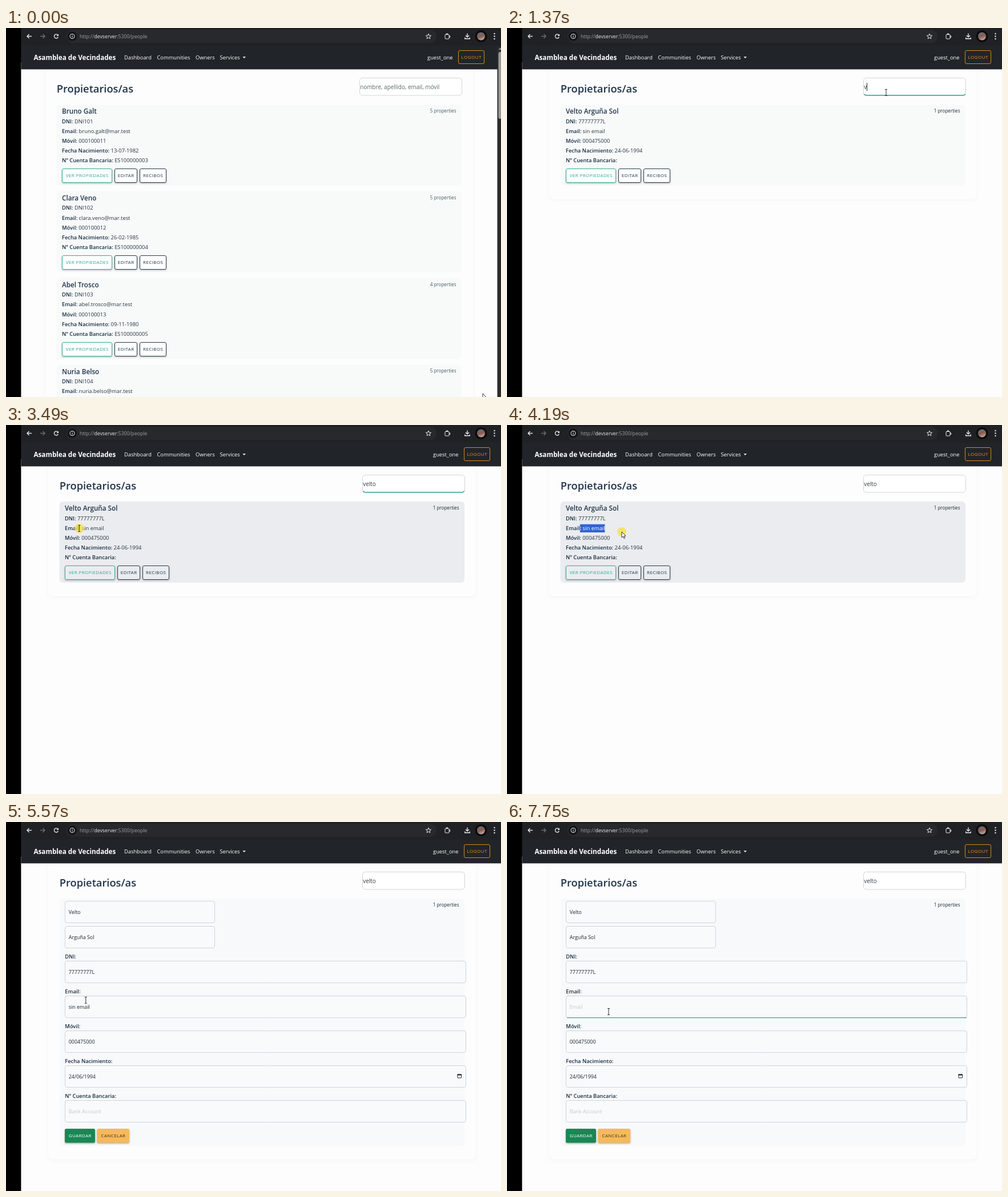
Recreate the animation shown at these times as an HTML page with a canvas. Size 867 by 646 pixels, loop 8000 ms.

```html
<!DOCTYPE html>
<html lang="es">
<head>
<meta charset="utf-8">
<title>Propietarios/as</title>
<style>
html, body { margin: 0; width: 100%; height: 100%; overflow: hidden; background: #000; }
canvas { display: block; width: 867px; height: 646px; }
</style>
</head>
<body>
<canvas id="stage" width="867" height="646"></canvas>
<script>
const ctx = document.getElementById('stage').getContext('2d');
const LOOP = 8000;
const FILTER = 1300, PRESS = 3480, RELEASE = 4250, EDIT = 4820, FORM = 5030, FOCUS = 6120;
const LEFT = 26.4, NAV_END = 72.4;
const INK = '#20344a', LABEL = '#182c40', VALUE = '#26333f';
const TEAL = '#2ba39a', LINE = '#d0d5da', GREY = '#9aa0a6';
const FIRST = 'Velto', LAST = 'Arguña Sol', PHONE = '000475000';
const SEARCH = 'velto', MAIL = 'sin email';

const owners = ['Bruno Galt', 'Clara Veno', 'Abel Trosco', 'Nuria Belso'].map((name, i) => ({
  name,
  dni: 'DNI10' + (i + 1),
  mail: name.toLowerCase().replace(' ', '.') + '@mar.test',
  phone: '00010001' + (i + 1),
  born: ['13-07-1982', '26-02-1985', '09-11-1980', '17-04-1988'][i],
  bank: 'ES10000000' + (i + 3),
  count: i === 2 ? 4 : 5
}));
const found = {
  name: FIRST + ' ' + LAST, dni: '77777777L', mail: MAIL, phone: PHONE,
  born: '24-06-1994', bank: '', count: 1
};

// time, x, y, pointer shape from this moment on
const path = [
  [0, 835, 640, 'arrow'], [70, 835, 640, 'arrow'], [500, 672, 128, 'arrow'],
  [560, 664, 113, 'beam'], [2150, 664, 113, 'beam'], [2390, 180, 214, 'beam'],
  [2590, 192, 232, 'beam'], [2940, 174, 252, 'arrow'], [3300, 136, 190, 'beam'],
  [PRESS, 128, 181, 'beam'], [3700, 172, 183, 'arrow'], [3910, 201, 187, 'arrow'],
  [RELEASE, 201, 187, 'arrow'], [4640, 221, 259, 'hand'], [4750, 222, 265, 'hand'],
  [FORM, 222, 265, 'arrow'], [5220, 222, 265, 'beam'], [5700, 122, 322, 'beam'],
  [5990, 178, 332, 'beam'], [LOOP, 178, 332, 'beam']
];
const presses = [[560, 700], [PRESS, RELEASE], [EDIT, FORM], [FOCUS, 6260]];

const within = (t, a, b) => t >= a && t < b;
const ramp = (t, a, b) => Math.min(1, Math.max(0, (t - a) / (b - a)));
const ease = p => p * p * (3 - 2 * p);

function font(size, weight = 400, gap = 0) {
  ctx.font = `${weight} ${size}px "Open Sans", "Noto Sans", sans-serif`;
  ctx.letterSpacing = gap + 'px';
}

// y is the middle of the capitals; returns the x where the text ends
function text(str, x, y, size, color, weight = 400, align = 'left', gap = 0) {
  font(size, weight, gap);
  ctx.textAlign = align;
  ctx.fillStyle = color;
  ctx.fillText(str, x, Math.round(y + size * 0.36));
  return x + ctx.measureText(str).width;
}

function rect(x, y, w, h, color) {
  ctx.fillStyle = color;
  ctx.fillRect(x, y, w, h);
}

function box(x, y, w, h, r, fill, stroke) {
  ctx.beginPath();
  ctx.roundRect(x, y, w, h, r);
  if (fill) { ctx.fillStyle = fill; ctx.fill(); }
  if (stroke) { ctx.strokeStyle = stroke; ctx.lineWidth = 1; ctx.stroke(); }
}

function disc(x, y, r, color) {
  ctx.beginPath();
  ctx.arc(x, y, r, 0, 7);
  ctx.fillStyle = color;
  ctx.fill();
}

function poly(points, fill, stroke, width = 1, close = true) {
  ctx.beginPath();
  points.forEach(([x, y]) => ctx.lineTo(x, y));
  if (close) ctx.closePath();
  if (fill) { ctx.fillStyle = fill; ctx.fill(); }
  if (stroke) { ctx.strokeStyle = stroke; ctx.lineWidth = width; ctx.stroke(); }
}

const line = (points, color, width = 1.4) => poly(points, null, color, width, false);

function arc(x, y, r, from, to, color, width) {
  ctx.beginPath();
  ctx.arc(x, y, r, from, to);
  ctx.strokeStyle = color;
  ctx.lineWidth = width;
  ctx.stroke();
}

function shadow(color, blur, dy) {
  ctx.shadowColor = color;
  ctx.shadowBlur = blur;
  ctx.shadowOffsetY = dy;
}
const noShadow = () => shadow('transparent', 0, 0);

// x and y are whole pixels, so that the one-pixel edge stays sharp
function button(label, x, y, w, color, fill, edge) {
  shadow('rgba(0,0,0,.3)', 3, 1.5);
  box(x, y, w, 24.5, 2.5, fill);
  noShadow();
  if (edge) box(x + 0.5, y + 0.5, w - 1, 24, 2.5, null, edge);
  text(label, x + w / 2 + 0.2, y + 12.5, 8, color, 500, 'center', 0.4);
}

function arrowIcon(x, dir, color) {
  line([[x - 4 * dir, 14.5], [x + 4 * dir, 14.5]], color);
  line([[x + 0.5 * dir, 11], [x + 4 * dir, 14.5], [x + 0.5 * dir, 18]], color);
}

function browser() {
  const white = '#e8eaed';
  rect(LEFT, 0, 841, 31, '#202124');
  box(106, 3, 648, 23, 11.5, '#28292c');
  arrowIcon(41, -1, white);
  arrowIcon(64, 1, '#6d7074');
  arc(88, 14.5, 3.5, 0.4, 5.6, white, 1.4);
  poly([[92, 10.5], [92, 14], [88.5, 14]], white);

  disc(116, 14.5, 8, '#121314');
  arc(116, 14.5, 4, 0, 7, white, 1.1);
  rect(115.5, 14, 1.1, 2.7, white);
  rect(115.5, 12, 1.1, 1.1, white);

  let x = text('http://', 129, 14.5, 8.7, GREY);
  x = text('devserver', x, 14.5, 8.7, white);
  text(':5300/people', x, 14.5, 8.7, GREY);

  const star = [];
  for (let i = 0; i < 10; i++) {
    const r = i % 2 ? 2.1 : 4.8, a = i * Math.PI / 5 - Math.PI / 2;
    star.push([740 + r * Math.cos(a), 14.8 + r * Math.sin(a)]);
  }
  poly(star, null, white);
  box(769, 11.5, 7, 7.5, 1, null, white);
  arc(772.5, 11.3, 1.5, Math.PI, 0, white, 1.2);
  arc(776.2, 15.2, 1.5, -Math.PI / 2, Math.PI / 2, white, 1.2);
  line([[808, 9.5], [808, 15.5]], white);
  line([[805, 13], [808, 16], [811, 13]], white);
  line([[803.7, 16.5], [803.7, 18.8], [812.3, 18.8], [812.3, 16.5]], white);
  disc(832, 14.5, 10.5, '#0c0c0d');
  const g = ctx.createLinearGradient(829, 8, 834, 21);
  g.addColorStop(0, '#5f7482');
  g.addColorStop(0.5, '#8f5a50');
  g.addColorStop(1, '#b5aaa4');
  disc(832, 14.5, 7, g);
  [10, 14.5, 19].forEach(y => disc(855.5, y, 1.2, white));
}

function navbar(dx) {
  rect(LEFT, 31, 841, NAV_END - 31, '#212529');
  text('Asamblea de Vecindades', 48.5, 51.5, 11.7, '#fff', 700);
  const links = [['Dashboard', 207], ['Communities', 264.5], ['Owners', 332], ['Services', 374.5]];
  links.forEach(([s, x]) => text(s, x, 51.5, 9.3, '#fff'));
  poly([[414.5, 50.3], [420, 50.3], [417.2, 53]], '#fff');
  text('guest_one', 782.5 + dx, 51.5, 9.3, '#fff', 400, 'right');
  box(792.5 + dx, 39.5, 45, 23, 2.5, null, '#d48a1c');
  text('LOGOUT', 815.2 + dx, 51.5, 8, '#e8951b', 400, 'center', 0.45);
}

function scrollbar() {
  rect(860.5, 33, 7, 613, '#2c2c2c');
  box(862.5, 42, 8, 117, 3, '#9c9c9c');
  poly([[863, 38], [868, 38], [865.5, 34.5]], '#9c9c9c');
}

function panel(x, bottom) {
  shadow('rgba(0,0,0,.04)', 5, 1);
  box(x, 60, 749, bottom - 60, 8, '#fdfdfd');
  noShadow();
}

function search(t, dx) {
  const x = 619.5 + dx;
  box(x, 87.5, 179, 30.5, 5, '#fff', LINE);
  const focus = ramp(t, 620, 900) * (1 - ramp(t, PRESS, PRESS + 200));
  if (focus) {
    ctx.save();
    ctx.globalAlpha = focus;
    ctx.beginPath();
    ctx.rect(x, 115.5, 179, 4);
    ctx.clip();
    ctx.beginPath();
    ctx.roundRect(x, 87.5, 179, 30.3, 5);
    ctx.strokeStyle = TEAL;
    ctx.lineWidth = 1.6;
    ctx.stroke();
    ctx.restore();
  }
  const n = t < FILTER ? 0 : Math.min(5, 1 + Math.floor((t - FILTER) / 85));
  let end = x + 0.8;
  if (n) end = text(SEARCH.slice(0, n), end, 103.5, 9.9, '#333b43');
  else text('nombre, apellido, email, móvil', end, 103.5, 9.93, '#5a6566');
  if (within(t, 600, 1100) || within(t, FILTER, 2140) || within(t, 2640, 3140)) {
    rect(Math.round(end), 96, 1, 14, '#222');
  }
}

function rows(o) {
  return [['DNI:', o.dni], ['Email:', o.mail], ['Móvil:', o.phone],
    ['Fecha Nacimiento:', o.born], ['Nº Cuenta Bancaria:', o.bank]];
}

function row([label, value], x, y, color) {
  const end = text(label + ' ', x, y, 9.3, color || LABEL, 600);
  return text(value, end, y, 9.4, color || VALUE);
}

function card(o, x, y, hover = 0, lit = false) {
  const mix = (a, b) => Math.round(a + (b - a) * hover);
  const bg = `rgb(${mix(248, 234)},${mix(250, 236)},${mix(250, 239)})`;
  box(x, y, 709.5, 142, 6, bg);
  const left = x + 9.5;
  text(o.name, left, y + 12, 11.7, INK, 600);
  text(o.count + ' properties', x + 700, y + 11, 8.1, o.count > 1 ? '#42605b' : '#1d282f', 400, 'right');
  rows(o).forEach((r, i) => row(r, left, y + 29.2 + i * 17.2));
  const fill = hover ? bg : '#fdfefe', top = Math.round(y) + 112;
  button('VER PROPIEDADES', left, top, 88, '#27a896', fill, '#37ae9d');
  button('EDITAR', left + 92, top, 40, lit ? '#fff' : INK, lit ? '#2b3b52' : fill, '#2c3e50');
  button('RECIBOS', left + 136, top, 47, INK, fill, '#2c3e50');
}

function selection(t, px) {
  if (!within(t, PRESS, EDIT)) return;
  const x = 103, y = 180.4;
  font(9.3, 600);
  const start = x + ctx.measureText('Email').width;
  const colon = x + ctx.measureText('Email: ').width;
  font(9.4);
  const end = colon + ctx.measureText(MAIL).width;
  const stop = t < RELEASE ? Math.min(end, px) : end;
  if (stop <= start) return;
  ctx.save();
  ctx.beginPath();
  ctx.rect(start, 173.5, stop - start, 14.5);
  ctx.clip();
  rect(start, 173.5, stop - start, 14.5, '#3264d0');
  row(['Email:', MAIL], x, y, '#fff');
  ctx.restore();
}

function field(value, y, w = 703, hint = '') {
  box(103.5, y + 0.5, w - 1, 38, 3.5, '#f8fafb', LINE);
  return text(value || hint, 109.8, y + 19.5, 8.9, value ? '#1b242b' : '#c5c9cc');
}

function mailLength(t) {
  if (t < 6800) return 9;
  if (t < 7200) return 8;
  return Math.max(0, 7 - Math.floor((t - 7200) / 50));
}

function form(t) {
  box(93.5, 134, 709.5, 433.5, 6, '#f8f9fa');
  text('1 properties', 793.5, 145, 8.1, '#1d282f', 400, 'right');
  field(FIRST, 138, 263);
  field(LAST, 182, 263);
  const mail = MAIL.slice(0, mailLength(t));
  const fields = [['DNI:', found.dni], ['Email:', mail, 'Email'], ['Móvil:', PHONE],
    ['Fecha Nacimiento:', '24/06/1994'], ['Nº Cuenta Bancaria:', '', 'Bank Account']];
  fields.forEach(([label, value, hint], i) => {
    const y = 243 + i * 60.9;
    text(label, 103.3, y - 7, 9.3, LABEL, 600);
    const end = field(value, Math.round(y), 703, hint);
    if (i !== 1) return;
    ctx.globalAlpha = ramp(t, FOCUS, FOCUS + 200);
    rect(105, 342, 700, 1.2, TEAL);
    ctx.globalAlpha = 1;
    if (within(t, FOCUS + 40, 6670) || within(t, 6800, 7750)) {
      rect(value ? Math.round(end - 0.5) : 110, 317, 1, 12, '#222');
    }
  });
  box(791, 442, 6.5, 6, 0.5, null, '#222');
  rect(790.5, 441.5, 7.5, 2, '#222');
  button('GUARDAR', 103, 537, 53, '#fff', '#198754');
  button('CANCELAR', 159.5, 537, 56.5, '#3d3523', '#f6b95b');
}

function pointerAt(t) {
  let i = 0;
  while (i < path.length - 2 && t >= path[i + 1][0]) i++;
  const [t0, x0, y0, kind] = path[i], [t1, x1, y1] = path[i + 1];
  const p = ease(ramp(t, t0, t1));
  return { x: x0 + (x1 - x0) * p, y: y0 + (y1 - y0) * p, kind };
}

function pointer({ x, y, kind }, t) {
  if (presses.some(([a, b]) => within(t, a, b))) disc(x, y, 8, 'rgba(246,226,64,.75)');
  ctx.save();
  ctx.translate(x, y);
  if (kind === 'arrow') {
    poly([[0, 0], [0, 10], [2.3, 8], [4, 11.6], [5.6, 10.9], [4, 7.4], [7, 7.2]], '#fff', '#222', 0.9);
  } else if (kind === 'beam') {
    line([[-2, -5.5], [2, -5.5]], '#333', 1);
    line([[-2, 5.5], [2, 5.5]], '#333', 1);
    line([[0, -5.5], [0, 5.5]], '#333', 1);
  } else {
    poly([[-1, -1], [0, -2], [1.2, -1], [1.2, 3], [3, 3], [4.6, 3.6], [6.5, 4.6], [6.5, 9],
      [5, 13.5], [-1, 13.5], [-4.5, 8], [-4, 6.7], [-1, 8.2]], '#fff', '#222', 0.9);
    [1.2, 3, 4.8].forEach(v => line([[v, 3.2], [v, 6]], '#222', 0.7));
  }
  ctx.restore();
}

function draw(t) {
  const filtered = t >= FILTER, dx = filtered ? 5 : 0;
  const mouse = pointerAt(t);
  rect(0, 0, 867, 646, '#000');
  rect(LEFT, 60, 841, 586, '#fdfdfd');
  panel(69 + dx, !filtered ? 700 : t < FORM ? 300 : 590.5);
  text('Propietarios/as', 88.7 + dx, 106, 18.3, INK, 600);
  search(t, dx);
  if (!filtered) {
    owners.forEach((o, i) => card(o, 88.5, 134 + i * 151.8));
  } else if (t < FORM) {
    card(found, 93.5, 134, ramp(t, 3080, 3380), t >= 4640);
    selection(t, mouse.x);
  } else {
    form(t);
  }
  navbar(2 * dx);
  if (!filtered) scrollbar();
  browser();
  pointer(mouse, t);
}

const start = performance.now();
function tick() {
  draw((performance.now() - start) % LOOP);
  requestAnimationFrame(tick);
}
tick();
</script>
</body>
</html>
```
